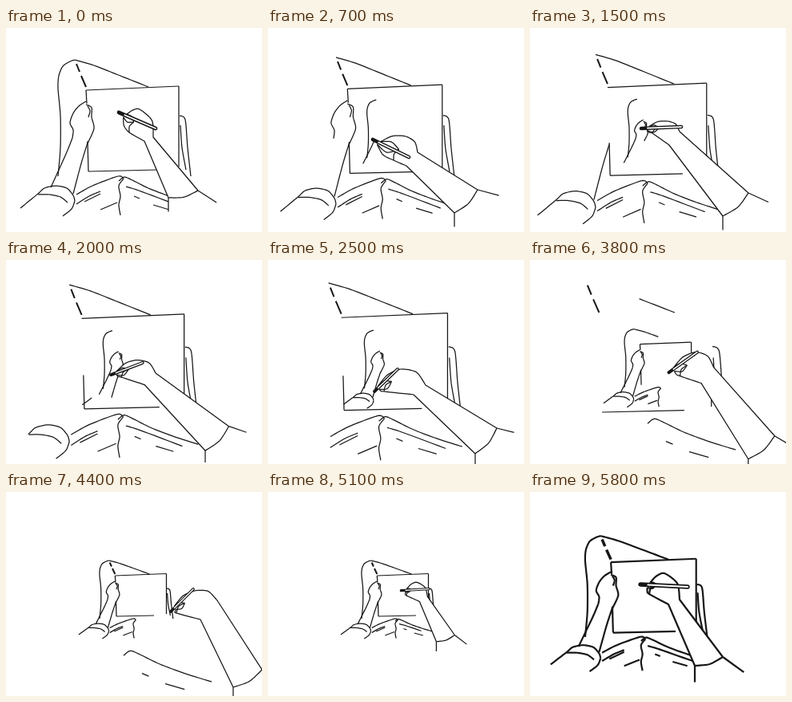
Write an HTML page with a canvas that moves like this. It is 320 px wide and 256 px high and loops after 5900 ms.

```html
<!DOCTYPE html>
<html lang="en">
<head>
<meta charset="utf-8">
<title>Drawing hands</title>
<style>
html, body { margin: 0; width: 100%; height: 100%; overflow: hidden; background: #fff; }
canvas { display: block; }
</style>
</head>
<body>
<canvas id="stage" width="320" height="256"></canvas>
<script>
const ctx = document.getElementById('stage').getContext('2d');
const LOOP = 5900, STEP = 100, ZOOM = 5200, INK = '#161616';
const mix = (a, b, u) => a + (b - a) * u;
const ramp = (t, a, b) => Math.max(0, Math.min(1, (t - a) / (b - a)));
const between = (p, q, u) => p.map((v, k) => mix(v, q[k], u));

// Point between p and q, pushed sideways by a share of their distance
function bulge(p, q, share, u = .5) {
  const [x, y] = between(p, q, u);
  return [x + (q[1] - p[1]) * share, y - (q[0] - p[0]) * share];
}

// Cameras are [x, y, scaleX, scaleY] around the paper's lower left corner
const PIVOT = [103, 180];

function outerCam(t) {
  const s = ramp(t, 0, 3200);
  return [103 - 13 * s * s, 180 + 11 * s, 1 + .21 * s ** 1.5, 1 + .18 * s];
}

function lapCam(t) {
  const [x, ...rest] = outerCam(t);
  return [x + 11 * ramp(t, 2500, 3300), ...rest];
}

// The small picture drifts left, then grows until it is the big one
function innerCam(t) {
  const drift = ramp(t, 0, 4400), z = ramp(t, ZOOM, LOOP);
  return [
    mix(146 - 8 * drift, 103, Math.sin(z * Math.PI / 2)),
    mix(161 - 5 * drift, 180, z),
    mix(.553, 1, z ** 1.3),
    mix(.5, 1, z ** 2)
  ];
}

const project = (pts, cam) => pts.map(p => p.map((v, k) => cam[k] + (v - PIVOT[k]) * cam[k + 2]));
const unproject = (pts, cam) => pts.map(p => p.map((v, k) => PIVOT[k] + (v - cam[k]) / cam[k + 2]));
const points = text => text.split(' ').map(pair => pair.split(',').map(Number));

// Each group leaves the big picture while it is drawn in the small one, line after line
const groups = [];
function group(from, to, lines, more = {}) {
  const shapes = lines.map(text => smooth(points(text)));
  groups.push({ from, to, shapes, total: shapes.reduce((sum, s) => sum + length(s), 0), cam: outerCam, ...more });
}

// Curve through all points
function smooth(p) {
  if (p.length < 3) return p;
  const out = [p[0]];
  for (let i = 0; i < p.length - 1; i++) {
    const [a, b, c, d] = [p[i - 1] || p[i], p[i], p[i + 1], p[i + 2] || p[i + 1]];
    for (let u = .125; u <= 1; u += .125) {
      out.push(b.map((v, k) => {
        const m = (c[k] - a[k]) * .4, n = (d[k] - b[k]) * .4, e = c[k] - v;
        return v + u * (m + u * (3 * e - 2 * m - n + u * (m + n - 2 * e)));
      }));
    }
  }
  return out;
}

function length(p) {
  let sum = 0;
  for (let i = 1; i < p.length; i++) sum += Math.hypot(p[i][0] - p[i - 1][0], p[i][1] - p[i - 1][1]);
  return sum;
}

// Stroke the stretch of a line between two fractions
function line(p, width, a = 0, b = 1, color = INK) {
  if (b <= a) return;
  const len = length(p);
  ctx.setLineDash(a > 0 || b < 1 ? [0, a * len, (b - a) * len, 9999] : []);
  ctx.lineWidth = width;
  ctx.strokeStyle = color;
  ctx.beginPath();
  p.forEach(q => ctx.lineTo(...q));
  ctx.stroke();
  ctx.setLineDash([]);
}

function blank(p) {
  ctx.beginPath();
  p.forEach(q => ctx.lineTo(...q));
  ctx.fillStyle = '#fff';
  ctx.fill();
}

// knee
group(0, 650, ['86,40 80,42 71,48 66,60 65,76 68,110 68,150 65,186']);
// left arm: forearm, hand, forearm, cuff
group(560, 700, ['83,138 75,158 56,200']);
group(850, 1500, [
  '100,92 91,98 84,107 80,119 84,128 83,138',
  '100,96 107,100 107,112 110,126 102,145',
  '102,98 105,104 103,112'
]);
group(1600, 2000, ['102,144 94,170 84,208']);
group(1900, 2450, [
  '18,226 40,208 48,201 62,198 76,201 84,210 86,217',
  '40,209 54,209 68,212 77,219', '86,217 82,227 71,236'
]);
// left side of the lap
group(2600, 3180, [
  '88,209 108,198 140,186 147,189', '88,221 104,211 118,205', '98,218 118,208',
  '118,228 139,219', '147,189 141,198 143,211 141,222 143,235'
], { cam: lapCam });
// paper
group(900, 1250, ['100,78 101,95'], { late: 2600 });
group(3300, 4050, ['103,180 102,142', '100,78 216,73', '216,73 216,174', '103,180 188,178']);
// shin and its crease
group(3500, 4000, ['86,40 110,47 143,60 178,74']);
group(3800, 4100, ['88,45 92,55', '94,60 100,74'], { bold: 1.6 });
// far leg
group(4050, 4350, ['217,110 224,115 227,150 231,186', '218,122 220,150 225,178']);
// right side of the lap
group(2700, 3150, ['150,199 166,204 214,222'], { cam: lapCam, late: 2050 });
group(4550, 5100, ['141,192 148,187 158,191 178,201 204,211 232,220', '160,211 167,214', '184,222 204,228'],
  { cam: lapCam });

// Arm poses: pen tip, pen end, knuckle, wrist, cuff, then heel, wrist and cuff below
const poses = [];
const pose = (t, text) => poses.push({ t, pts: points(text) });
pose(0, '141,106 187,126 167,102 184,137 240,204 154,131 173,142 203,213');
pose(700, '131,140 176,162 172,136 187,156 262,203 157,166 173,173 233,232');
pose(1500, '139,126 189,124 172,117 187,130 273,207 153,132 174,147 241,236');
pose(2500, '133,165 162,137 166,137 197,157 286,211 145,165 182,169 259,243');
pose(3200, '143,140 186,117 180,115 197,141 292,220 164,147 187,157 262,256');
pose(4400, '206,150 234,122 236,124 264,136 320,223 213,152 243,160 284,245');
const finalCam = innerCam(5800);
const finalArm = unproject(points('138,116 197,119 168,102 187,135 241,207 149,128 173,141 206,218'), finalCam);
poses.push({ t: ZOOM, pts: project(finalArm, innerCam(ZOOM)) });

function armAt(t) {
  if (t >= ZOOM) return project(finalArm, innerCam(t));
  const i = poses.findIndex(p => p.t > t), a = poses[i - 1], b = poses[i];
  const u = ramp(t, a.t, b.t);
  // sketching strokes, strongest halfway between poses
  const sway = 5 * Math.sin(u * Math.PI);
  const dx = sway * Math.cos(t / 90), dy = sway * Math.sin(t / 70);
  return a.pts.map((p, k) => {
    const [x, y] = between(p, b.pts[k], u);
    const hold = k === 4 || k === 7 ? .2 : 1;
    return [x + dx * hold, y + dy * hold];
  });
}

function drawArm(t, width) {
  const [tip, end, knuckle, wrist, cuff, heel, wristLow, cuffLow] = armAt(t);
  const size = Math.hypot(end[0] - tip[0], end[1] - tip[1]);
  const grip = bulge(tip, end, .04, .2), under = bulge(tip, end, -.06, .15);
  const fist = smooth([grip, bulge(grip, knuckle, .12), knuckle, bulge(knuckle, wrist, .2), wrist]);
  const palm = smooth([under, bulge(under, heel, -.15), heel, wristLow]);
  const rim = smooth([cuff, bulge(cuff, cuffLow, .1), cuffLow]);

  // the sleeve leaves the cuff flatter than the arm
  const angle = Math.atan2(cuff[1] - wrist[1], cuff[0] - wrist[0]) - .3;
  const sleeve = [cuff[0] + size * .55 * Math.cos(angle), cuff[1] + size * .55 * Math.sin(angle)];
  const hem = [cuffLow[0], cuffLow[1] + size * .35];

  blank([...fist, ...rim, ...palm.slice().reverse()]);
  blank([sleeve, ...rim, hem]);
  line([...fist, cuff], width);
  line([...palm, cuffLow], width);
  line(rim, width);
  line([cuff, sleeve], width);
  line([cuffLow, hem], width);

  // curled fingers
  const curl = between(knuckle, heel, .55);
  line(smooth([grip, bulge(grip, curl, .2), curl]), width);
  line(smooth([under, bulge(under, curl, -.25), curl]), width);
  line(smooth([curl, bulge(curl, heel, -.2), heel]), width);

  ctx.lineCap = 'round';
  line([tip, end], size * .085 + .4);
  line([between(tip, end, .16), end], size * .035, 0, 1, '#fff');
  ctx.lineCap = 'butt';
}

function draw(t) {
  ctx.fillStyle = '#fff';
  ctx.fillRect(0, 0, 320, 256);
  ctx.lineJoin = 'round';
  const width = 1.25 + 1.1 * ramp(t, ZOOM, LOOP);
  for (const { from, to, shapes, total, cam, late = 0, bold = 1 } of groups) {
    const gone = ramp(t, from, to), drawn = ramp(t, from + late, to + late);
    let sum = 0;
    for (const shape of shapes) {
      const a = sum / total, b = (sum += length(shape)) / total;
      line(project(shape, cam(t)), width * bold, ramp(gone, a, b), 1);
      line(project(shape, innerCam(t)), width * bold, 0, ramp(drawn, a, b));
    }
  }
  drawArm(t, width);
}

const start = performance.now();
function tick(now) {
  const t = Math.max(0, now - start) % LOOP;
  draw(Math.floor(t / STEP) * STEP);
  requestAnimationFrame(tick);
}
draw(0);
requestAnimationFrame(tick);
</script>
</body>
</html>
```
